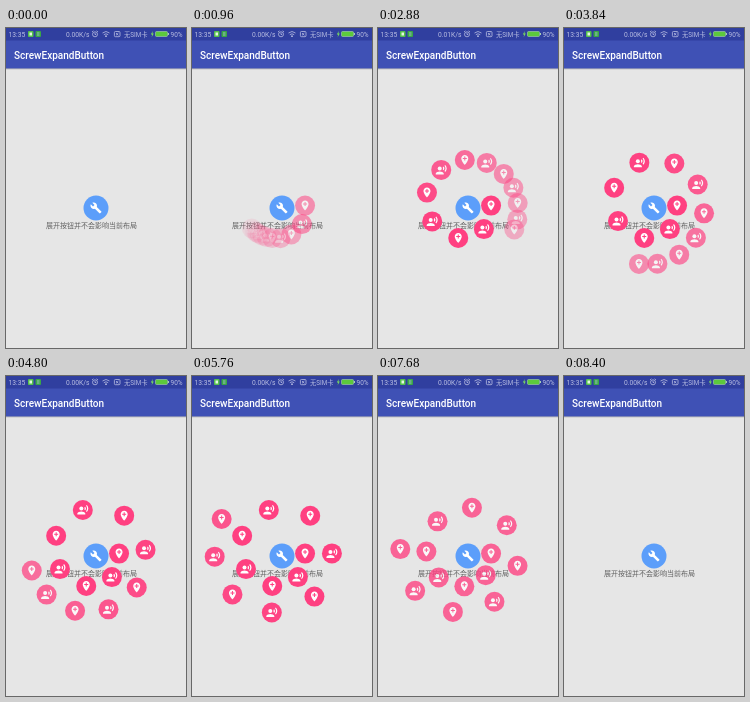
An HTML page for the animation above (8.64 s loop, 180 px wide and 320 px high).

```html
<!DOCTYPE html>
<html lang="zh">
<head>
<meta charset="utf-8">
<style>
html, body { margin: 0; width: 100%; height: 100%; overflow: hidden; background: #e6e6e6; }
svg { display: block; width: 100vw; height: 100vh; }
text { font-family: Roboto, "Noto Sans CJK SC", "Noto Sans CJK", sans-serif; }
.status { font-size: 6.7px; fill: #b9bee2; }
.line { fill: none; stroke: #b9bee2; stroke-width: .8; }
</style>
</head>
<body>
<svg viewBox="0 0 180 320">
  <defs>
    <linearGradient id="shade" x2="0" y2="1">
      <stop stop-color="#000" stop-opacity=".22"/>
      <stop offset="1" stop-color="#000" stop-opacity="0"/>
    </linearGradient>
    <g id="pin" fill="#fff" transform="scale(.5) translate(-12 -12)">
      <path d="M12 2C8.14 2 5 5.14 5 9c0 5.25 7 13 7 13s7-7.75 7-13c0-3.86-3.14-7-7-7zm4 8h-3v3h-2v-3H8V8h3V5h2v3h3v2z"/>
    </g>
    <g id="voice" fill="#fff" transform="scale(.5) translate(-12 -12)">
      <circle cx="9" cy="9" r="4"/>
      <path d="M9 15c-2.67 0-8 1.34-8 4v2h16v-2c0-2.66-5.33-4-8-4zM16.76 5.36l-1.68 1.69c.84 1.18.84 2.71 0 3.89l1.68 1.69c2.02-2.02 2.02-5.07 0-7.27zM20.07 2l-1.63 1.63c2.77 3.02 2.77 7.56 0 10.74L20.07 16c3.9-3.89 3.91-9.95 0-14z"/>
    </g>
  </defs>

  <rect width="180" height="320" fill="#e6e6e6"/>
  <rect width="180" height="40.5" fill="#3f51b5"/>
  <rect width="180" height="12.5" fill="#303f9f"/>
  <rect y="40.5" width="180" height="1.5" fill="url(#shade)"/>

  <text class="status" x="2.5" y="8.7">13:35</text>
  <rect x="22" y="3" width="5.5" height="6" rx="1" fill="#55c24b"/>
  <rect x="23.5" y="4.5" width="2.5" height="3" fill="#e5f5e3"/>
  <rect x="29.5" y="3" width="5.5" height="6" rx="1" fill="#39a845"/>
  <path d="M31 5h2.5M31 7h2.5" class="line"/>
  <text class="status" id="speed" x="60" y="8.7"></text>
  <g class="line">
    <circle cx="89" cy="6.3" r="2.5"/>
    <path d="M89 4.8v1.7h1.2M86 4l1.4-1.2M92 4l-1.4-1.2"/>
    <path d="M96.5 5q3.5-3 7 0M97.8 6.7q2.2-1.8 4.4 0"/>
    <rect x="108.4" y="3.5" width="5.6" height="5.2" rx="1"/>
    <path d="M110 5l2.4 2.3M112.4 5L110 7.3"/>
  </g>
  <circle cx="100" cy="8.2" r=".9" fill="#b9bee2"/>
  <text class="status" x="118" y="8.7" style="font-size:6.3px">无SIM卡</text>
  <path d="M146.8 3l-2 3.6h1.4l-.6 2.6 2.2-3.7h-1.4z" fill="#7be05c"/>
  <rect x="149.5" y="3.5" width="12" height="5" rx="1" fill="#5cc93c" stroke="#a9cfb0" stroke-width=".6"/>
  <rect x="162" y="5" width="1" height="2" fill="#a9cfb0"/>
  <text class="status" x="164.5" y="8.7" style="font-size:6.5px">90%</text>

  <text x="8" y="30.8" font-size="10" font-weight="500" fill="#fff">ScrewExpandButton</text>
  <text x="40" y="200" font-size="7" fill="#606060">展开按钮并不会影响当前布局</text>

  <g id="items"></g>
  <circle cx="90" cy="180" r="12.5" fill="#5c9efa"/>
  <path transform="translate(90 180) scale(.5) translate(-12 -12)" fill="#fff" d="M22.7 19l-9.1-9.1c.9-2.3.4-5-1.5-6.9-2-2-5-2.4-7.4-1.3L9 6 6 9 1.6 4.7C.4 7.1.9 10.1 2.9 12.1c1.9 1.9 4.6 2.4 6.9 1.5l9.1 9.1c.4.4 1 .4 1.4 0l2.3-2.3c.5-.4.5-1.1.1-1.4z"/>
</svg>
<script>
const LOOP = 8640, OPEN = 200, SETTLED = 1440, CLOSE = 7400, CLOSED = 8300;
const CENTER = { x: 90, y: 180 };
const BRAKE = 3 / 960; // square root of the angular deceleration, per ms

// Resting place on the spiral (degrees, pixels) and arrival time of each item.
const stops = [
  [-6, 23.2, 1200], [53, 26.4, 1850], [108, 31.6, 2480], [160, 38.3, 3120],
  [207, 44.7, 3690], [254, 47.8, 4280], [305, 49.2, 4875], [357, 50, 5450],
  [412, 52, 6010], [466, 58, 6530], [516, 64.5, 6950], [562, 70, 7280], [606, 73.6, 7640]
].map(([angle, radius, arrival]) => ({ angle, radius, arrival }));
const FIRST = stops[0].angle;

const mix = (a, b, u) => a + (b - a) * u;
const clamp = u => Math.min(1, Math.max(0, u));
const within = (t, from, to) => t >= from && t < to;

function radiusAt(angle) {
  let i = 1;
  while (i < stops.length - 1 && stops[i].angle < angle) i++;
  const a = stops[i - 1], b = stops[i];
  return mix(a.radius, b.radius, (angle - a.angle) / (b.angle - a.angle));
}

// Share of the way travelled along the spiral, 0 to 1.
function travelled(stop, t) {
  if (t <= OPEN || t >= CLOSED) return 0;
  if (t > CLOSE) return travelled(stop, CLOSE) * (1 - ((t - CLOSE) / (CLOSED - CLOSE)) ** 2);
  const span = stop.angle - FIRST;
  if (!span) return clamp((t - OPEN) / (stop.arrival - OPEN));
  const begin = stop.arrival - Math.sqrt(span) / BRAKE;
  const time = t < SETTLED ? mix(begin, SETTLED, (t - OPEN) / (SETTLED - OPEN)) : t;
  return clamp(1 - (BRAKE * Math.max(0, stop.arrival - time)) ** 2 / span);
}

const layer = document.getElementById('items');
layer.innerHTML = stops.map((_, i) =>
  `<g><circle r="10" fill="#ff4081"/><use href="#${i % 2 ? 'voice' : 'pin'}"/></g>`).join('');
const nodes = [...layer.children];
const speed = document.getElementById('speed');

function draw(t) {
  stops.forEach((stop, i) => {
    const share = travelled(stop, t);
    const angle = mix(FIRST, stop.angle, share);
    const radius = radiusAt(angle), turn = angle * Math.PI / 180;
    const x = CENTER.x + radius * Math.cos(turn), y = CENTER.y + radius * Math.sin(turn);
    nodes[i].setAttribute('transform', `translate(${x.toFixed(2)} ${y.toFixed(2)})`);
    nodes[i].setAttribute('opacity', (share ** 2.3).toFixed(3));
  });
  const busy = within(t, 1440, 3120) || within(t, 6240, 7440);
  speed.textContent = busy ? '0.01K/s' : '0.00K/s';
}

const start = performance.now();
function tick() {
  draw((performance.now() - start) % LOOP);
  requestAnimationFrame(tick);
}
draw(0);
requestAnimationFrame(tick);
</script>
</body>
</html>
```
